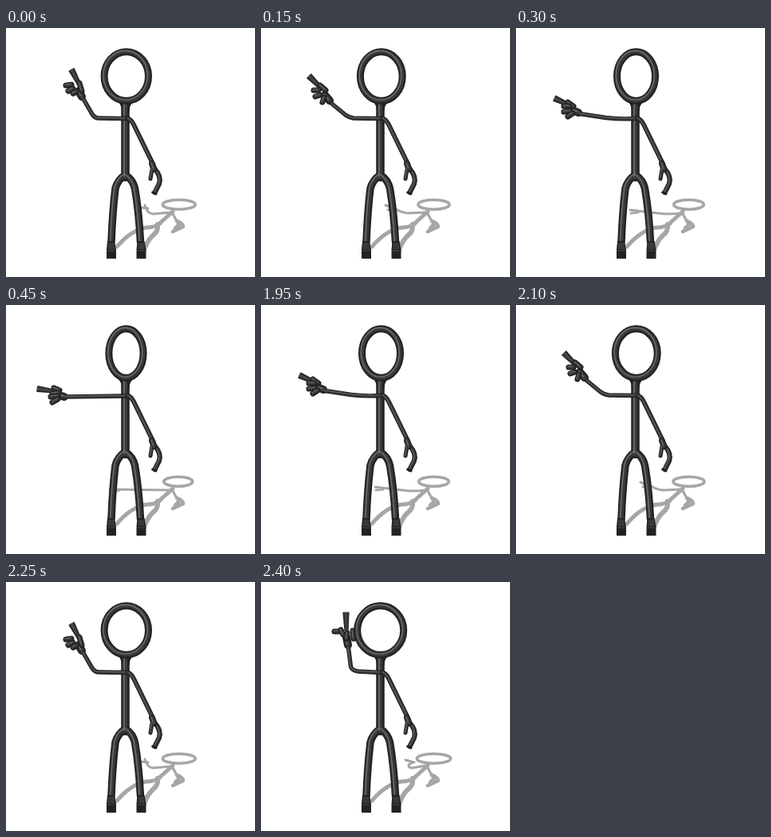
These frames come from a looping animation (312 by 312 pixels, 2.55 s). An HTML page:

```html
<!DOCTYPE html>
<html lang="en">
<head>
<meta charset="utf-8">
<title>Pointing stick figure</title>
<style>
  html, body { margin: 0; width: 100%; height: 100%; overflow: hidden; background: #fff; }
  svg { display: block; width: 100vw; height: 100vh; }
  path, ellipse { stroke-linecap: round; stroke-linejoin: round; }
</style>
</head>
<body>
<svg id="stage" viewBox="0 0 312 312"></svg>
<script>
const stage = document.getElementById('stage');
const SHADOW = '#a6a6a6';

// Tube shading: colour, share of the width, offset towards the light.
const LAYERS = [['#212122', 1, 0], ['#39393a', .6, -.04], ['#707071', .15, -.13]];

function add(parent, tag, attrs) {
  const node = document.createElementNS('http://www.w3.org/2000/svg', tag);
  for (const key in attrs) node.setAttribute(key, attrs[key]);
  parent.appendChild(node);
  return node;
}

const group = parent => add(parent, 'g', { fill: 'none' });
const line = (g, d, width, color) =>
  add(g, 'path', { d, stroke: color, 'stroke-width': width });

// Tubes in one call share their layers, so their joints blend.
function tubes(g, ...list) {
  for (const [color, share, shift] of LAYERS)
    for (const [width, d] of list) {
      const part = line(g, d, width * share, color);
      part.setAttribute('transform', `translate(${width * shift} ${width * shift})`);
    }
}

function ring(g, cx, rx) {
  const cy = 60.5, ry = 30.8, width = 9;
  for (const [color, share, shift] of LAYERS)
    add(g, 'ellipse', { cx: cx + width * shift, cy: cy + width * shift, rx, ry,
      stroke: color, 'stroke-width': width * share });
}

// Extended finger: narrow at the knuckle, wide and flat at the tip.
function pointer(g, [x1, y1, x2, y2]) {
  const length = Math.hypot(x2 - x1, y2 - y1);
  const nx = -(y2 - y1) / length, ny = (x2 - x1) / length;
  const wedge = (a, b, fill) => add(g, 'path', { fill,
    d: `M${x1 + nx * a} ${y1 + ny * a}L${x2 + nx * b} ${y2 + ny * b}` +
       `L${x2 - nx * b} ${y2 - ny * b}L${x1 - nx * a} ${y1 - ny * a}Z` });
  wedge(2.6, 4.1, '#242425');
  wedge(1.2, 2, '#454546');
  line(g, `M${x2 + nx * 3} ${y2 + ny * 3}L${x2 - nx * 3} ${y2 - ny * 3}`, 1, '#5c5c5d');
}

const poses = {
  raised: {
    head: [149.7, 29], shade: [216.5, 21.2],
    arm: 'M149 113.500L122 112Q114 111 112.500 106L109.500 82',
    palm: 'M109 79L107 69', pointer: [107, 61, 106.5, 38],
    fingers: ['M115 61L116 71', 'M98 62L92 62', 'M103 66L100 60', 'M108 64L107 71'],
    shadow: 'M206 230L190 233Q184 233 185 229L190 226M192 226L181 223'
  },
  high: {
    head: [150.8, 27.7], shade: [216.8, 20.5],
    arm: 'M149 113.500L117 113Q111 113 108 108L97 89',
    palm: 'M95 86L91 79', pointer: [92, 71, 82, 52],
    fingers: ['M92 69L95 79', 'M82 71L75 72', 'M84 76L78 79', 'M88 80L84 82'],
    shadow: 'M207 231L184 233Q178 232 176 227L174 222M178 226L169 225'
  },
  middle: {
    head: [150.8, 26.4], shade: [216.5, 19.6],
    arm: 'M149 113.500L116 113Q110 112 106 109L89 95',
    palm: 'M86 91L80 84', pointer: [77, 77, 60, 60],
    fingers: ['M74 72L81 78', 'M72 78L66 78', 'M74 84L68 86', 'M79 87L77 93'],
    shadow: 'M207 231L184 232Q176 231 171 228L156 222M165 226L159 228'
  },
  low: {
    head: [150.5, 24], shade: [216.5, 18.8],
    arm: 'M149 113.500Q130 114.500 113 112.500L80 107.500',
    palm: 'M78 106L71 103', pointer: [70, 98, 48, 88],
    fingers: ['M65 93L72 98', 'M67 98L60 98', 'M68 104L60 105', 'M71 107L65 111'],
    shadow: 'M207 232Q189 234 177 232L143 228M153 231L144 232'
  },
  level: {
    head: [150.5, 21.6], shade: [215.8, 18],
    arm: 'M149 114L75 115',
    palm: 'M73 115L66 113', pointer: [60, 108, 39, 105],
    fingers: ['M60 104L67 107', 'M66 110L58 111', 'M65 114L56 115', 'M65 118L58 122'],
    shadow: 'M207 232L130 231M142 232L135 234'
  }
};

function drawShadow(g) {
  line(g, 'M209 230L190 247', 5, SHADOW);
  line(g, 'M193 245Q186 250 176 250Q157 253 139 274', 5, SHADOW);
  line(g, 'M190 246Q191 255 184 260Q177 266 171 283', 6, SHADOW);
  line(g, 'M208 231L215 244', 3.2, SHADOW);
  line(g, 'M214 242Q221 244 222 249L209 255M216 247L212 251', 4.6, SHADOW);
}

function foot(g, x, slant) {
  add(g, 'path', { fill: '#222223',
    d: `M${x - 4 - slant} 267h9l2 11v11h-12v-11Z` });
  add(g, 'path', { fill: '#39393a', d: `M${x - 3 - slant} 269h7l1 8h-8Z` });
  line(g, `M${x - 4} 279h9`, .8, '#565657');
}

function drawBody(g) {
  add(g, 'path', { fill: LAYERS[0][0],
    d: 'M140 92Q145 97 145 104H154.500Q154.500 97 160 92Z' });
  tubes(g,
    [9.5, 'M149.500 184Q140 190 137 201Q133.500 230 132 268'],
    [9.5, 'M149.500 184Q159 190 161.500 201Q166.500 230 168.500 268'],
    [10.5, 'M149.500 97V187']);
  foot(g, 131, 0);
  foot(g, 168.5, 0);
  tubes(g, [5.8, 'M152 113Q157 115 160 121L183 168']);
  tubes(g, [6.2, 'M186 176Q195 186 192 195L186.500 206']);
  tubes(g, [8, 'M183 170L185.500 177'], [5, 'M183 177L181 189']);
  line(g, 'M183.500 206L188 208', 2.8, '#202021');
}

drawShadow(group(stage));
const shadowLayer = group(stage);
const bodyLayer = group(stage);
drawBody(bodyLayer);
const poseLayer = group(stage);

for (const pose of Object.values(poses)) {
  const shade = group(shadowLayer), figure = group(poseLayer);
  add(shade, 'ellipse', { cx: pose.shade[0], cy: 221.3, rx: pose.shade[1], ry: 6,
    stroke: SHADOW, 'stroke-width': 3.6 });
  line(shade, pose.shadow, 3, SHADOW);
  ring(figure, ...pose.head);
  tubes(figure, [5.4, pose.arm], [10, pose.palm]);
  pointer(figure, pose.pointer);
  for (const d of pose.fingers) tubes(figure, [7, d]);
  pose.layers = [shade, figure];
}

const LOOP = 2550;
const steps = [
  [0, 'high'], [150, 'middle'], [300, 'low'], [450, 'level'],
  [1950, 'low'], [2100, 'middle'], [2250, 'high'], [2400, 'raised']
];

function show(time) {
  const current = steps.findLast(([start]) => start <= time)[1];
  for (const name in poses)
    for (const layer of poses[name].layers)
      layer.style.display = name === current ? '' : 'none';
}

const began = performance.now();
function tick() {
  show((performance.now() - began) % LOOP);
  requestAnimationFrame(tick);
}
tick();
</script>
</body>
</html>
```
